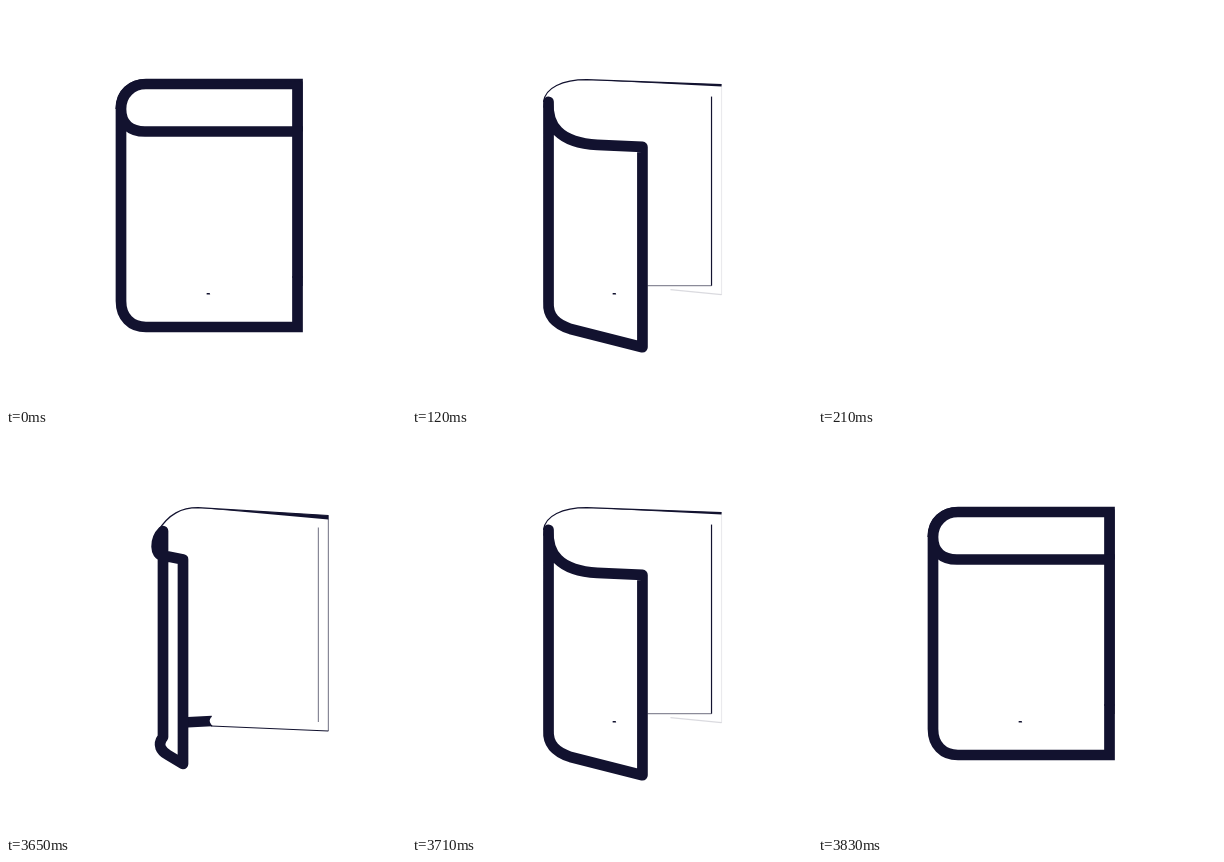
Animation of 400 by 400 pixels, one loop 4860 ms. Source, as an HTML page:

```html
<!DOCTYPE html>
<html lang="en">
<head>
<meta charset="utf-8">
<title>Book</title>
<style>
  html, body { margin: 0; width: 100%; height: 100%; overflow: hidden; background: #fff; }
  svg { display: block; width: 100%; height: 100%; }
  path { fill: none; stroke: #12122f; stroke-width: 1.2; }
  .thick { stroke-width: 10.7; }
  #wedge { fill: #12122f; stroke: none; }
  #gap { stroke: #fff; }
  circle { fill: #fff; }
</style>
</head>
<body>
<svg viewBox="0 0 400 400">
  <path id="spine" class="thick"/>
  <circle id="notch"/>
  <path id="block" class="thick"/>
  <circle cx="208.5" cy="286.8" r="4.8"/>
  <path id="rim"/>
  <path id="wedge"/>
  <path id="side"/>
  <path id="page"/>
  <path id="foot"/>
  <path id="base"/>
  <path id="cover" class="thick"/>
  <path id="gap"/>
  <path id="edge"/>
</svg>
<script>
const LOOP = 4860, STEP = 30, REOPEN = 3650, GONE = 7;
const $ = id => document.getElementById(id);
const svg = document.querySelector('svg');

function draw(id, d, alpha = 1) {
  $(id).setAttribute('d', d);
  $(id).style.opacity = Math.min(1, Math.max(0, alpha));
}

function pose(step) {
  svg.style.visibility = step === GONE ? 'hidden' : 'visible';
  const u = step / (GONE - 1);
  const swing = u * (0.4 + 0.6 * u);                // free edge of the cover
  const turn = u ** 1.65;                           // spine and back cover
  const sway = Math.sin(Math.PI * swing) ** 2;      // lean towards the viewer
  const bulge = swing ** 3;                         // spine folding over

  // front cover
  const left = 115 + 42 * turn;
  const right = 291.5 - 114.5 * swing;
  const top = 125.5 + 15.6 * sway;
  const bottom = 321 + 15.6 * sway + 9 * swing;
  const joint = 103 - 6 * swing - 4 * sway;
  const browX = left + 24 * (1 - swing) + 38 * sway;
  const browY = top - 4 * swing;
  draw('cover', `M${left} ${joint}
    C${left - 9 * bulge} ${117 + 4 * sway - 11 * bulge}
     ${left + 9 + 4 * sway - 17 * bulge} ${browY - 2 * sway} ${browX} ${browY}
    L${right} ${top}V${bottom}
    L${left + 25 - 20 * bulge} ${321 + 2 * sway}
    C${left + 10 - 12 * bulge} ${321 - 2 * sway - 4 * bulge}
     ${left - 6 * bulge} 311 ${left} ${295 + 8 * bulge}Z`);
  $('cover').style.strokeLinejoin = u < 0.5 ? 'miter' : 'round';

  // head of the spine, and the back cover's top line being covered up
  const crown = left + 25 + 10 * swing + 8 * sway;
  const tip = 291.5 - 262 * u * u;
  const arch = (dx, dy) => `M${left + dx} ${joint}
    C${left + 11 * bulge + dx} ${88 - 4 * swing + dy}
     ${left + 11 + 10 * swing + dx / 2} ${78 + dy} ${crown} ${78 + dy}`;
  draw('spine', arch(0, 0) + `L${tip} ${78 + 3 * u}` + (step ? '' : `V${top}`),
    tip > crown + 10 ? 1 : 0);
  $('notch').setAttribute('cx', tip + 0.5);
  $('notch').setAttribute('cy', 79.6 + 3 * u);
  $('notch').setAttribute('r', Math.min(4.8, 40 * u));

  // thin outlines of the back cover and its pages
  const far = 296 + 26.4 * turn;
  const roof = 75.5 + 6 * turn;
  const floor = 280 + 17 * turn;
  const inner = far - 10;
  const sideAlpha = Math.abs(Math.cos(Math.PI * swing)) * (1.2 - 0.7 * turn);
  const edgeAlpha = Math.sin(2 * Math.PI * swing);
  draw('rim', arch(-5, -4.3) + `L${far} ${roof}`);
  draw('wedge', `M${crown} 73.7L${far} ${roof}v${4 * turn}Z`);
  draw('side', `M${far} ${roof}V${floor}`, sideAlpha);
  draw('page', `M${inner} ${roof + 12}V${floor - 9}`, 1.1 - 1.2 * sideAlpha);
  draw('foot', `M${right + 5} ${floor - 9}H${inner}`, 1 - turn);
  draw('base', `M${right + 28} ${floor - 5}L${far} ${floor}`, bulge);
  draw('block', `M${Math.min(right, 206)} 288.5L206 287`);
  draw('gap', `M${right + 4.4} ${top}V283`, edgeAlpha);
  draw('edge', `M${right + 5.4} ${top}V280`, edgeAlpha);
}

function stepAt(t) {
  if (t < GONE * STEP) return Math.floor(t / STEP);
  if (t < REOPEN) return GONE;
  return Math.max(0, GONE - 1 - Math.floor((t - REOPEN) / STEP));
}

let shown = -1;
function tick(now) {
  const step = stepAt(Math.max(0, now) % LOOP);
  if (step !== shown) pose(shown = step);
  requestAnimationFrame(tick);
}
pose(0);
requestAnimationFrame(tick);
</script>
</body>
</html>
```
